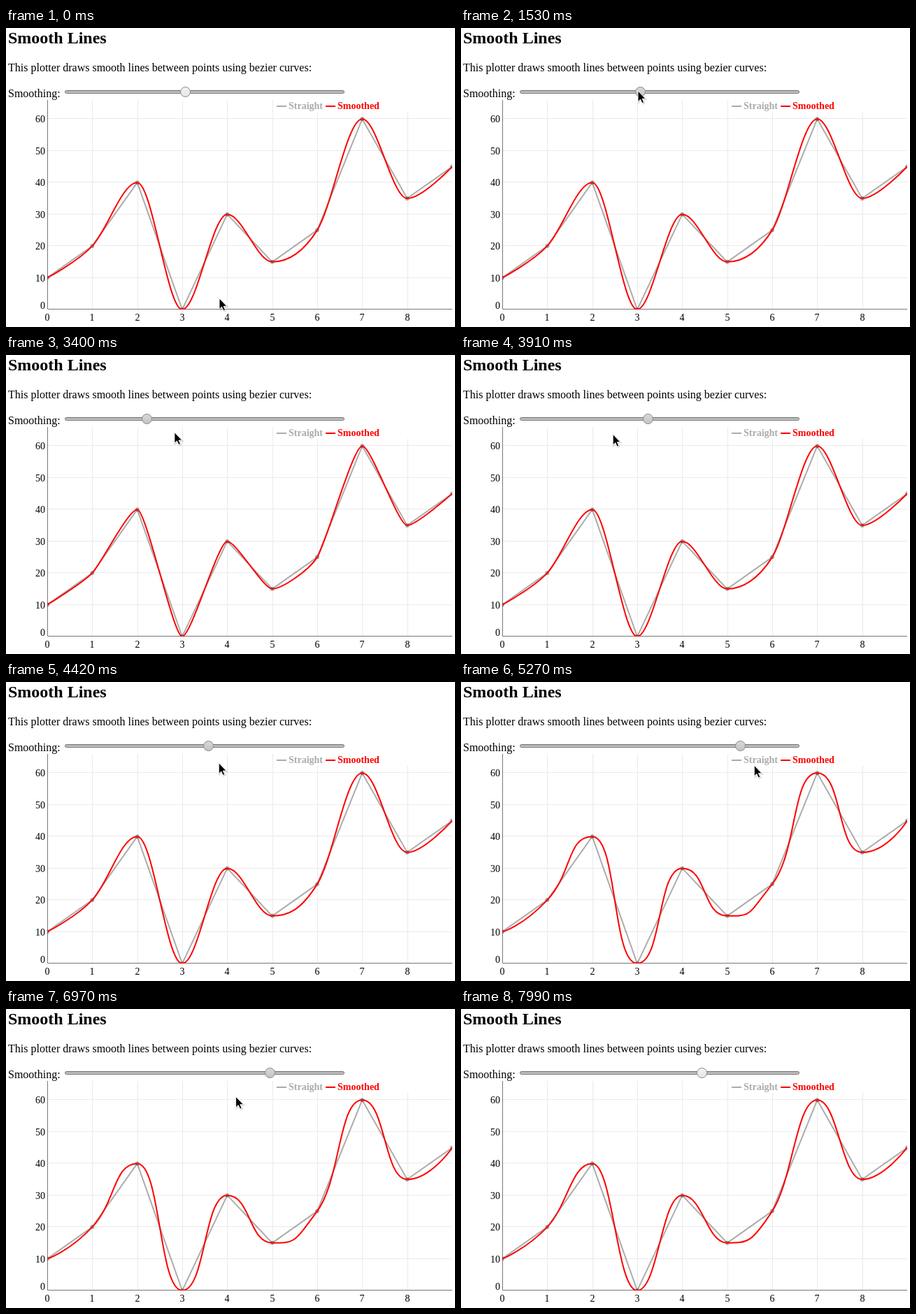
An HTML page that plays this animation: 642x428 px, repeating every 8.33 s.

```html
<!DOCTYPE html>
<html lang="en">
<head>
<meta charset="utf-8">
<title>Smooth Lines</title>
<style>
  html, body { margin: 0; width: 100%; height: 100%; overflow: hidden; background: #fff; }
  svg { display: block; font: 16px "Liberation Serif", "Times New Roman", Times, serif; }
  .title { font-size: 24px; font-weight: bold; }
  .axis { font-size: 14px; }
  .legend { font-size: 14px; font-weight: bold; }
  .mid { text-anchor: middle; }
  .end { text-anchor: end; }
  .line { fill: none; stroke-width: 2; }
  #grid path { stroke: #eaeaea; }
</style>
</head>
<body>
<svg width="642" height="428" viewBox="0 0 642 428">
  <defs>
    <clipPath id="area"><rect x="59" y="103" width="579" height="300"/></clipPath>
    <linearGradient id="bar" x2="0" y2="1">
      <stop offset="0" stop-color="#a8a8a8"/><stop offset="1" stop-color="#d0d0d0"/>
    </linearGradient>
    <linearGradient id="idle" x2="0" y2="1">
      <stop offset="0" stop-color="#f2f2f2"/><stop offset="1" stop-color="#e6e6e6"/>
    </linearGradient>
    <linearGradient id="held" x2="0" y2="1">
      <stop offset="0" stop-color="#d8d8d8"/><stop offset="1" stop-color="#c4c4c4"/>
    </linearGradient>
  </defs>

  <text class="title" x="3" y="22">Smooth Lines</text>
  <text x="3" y="62">This plotter draws smooth lines between points using bezier curves:</text>
  <text x="3" y="99">Smoothing:</text>

  <g id="grid"></g>
  <rect x="386" y="103" width="250" height="17" fill="#fff"/>
  <path d="M59.5 103V402.5H638" fill="none" stroke="#777"/>
  <g id="labels" class="axis"></g>

  <g clip-path="url(#area)">
    <g id="straight"></g>
    <path id="smooth" class="line" stroke="#f00"/>
  </g>

  <g class="legend">
    <path d="M387 112h14" stroke="#ababab" stroke-width="2"/>
    <text x="404" y="116" fill="#ababab">Straight</text>
    <path d="M457 112h14" stroke="#f00" stroke-width="2"/>
    <text x="474" y="116" fill="#f00">Smoothed</text>
  </g>

  <rect x="84.5" y="89.5" width="399" height="4" rx="2" fill="url(#bar)" stroke="#747474"/>
  <circle id="thumb" cy="91.5" r="7" stroke="#878787"/>
  <g id="cursor">
    <path d="M1 2V16.500L4.500 13.200 7 18.500 9.400 17.400 7 12.200H11.500Z" opacity=".14" stroke="#000" stroke-width="2"/>
    <path d="M0 0V15.500L3.500 12.200 6 17.600 8.500 16.500 6.100 11.300H10.800Z" stroke="#fff" stroke-width=".9"/>
  </g>
</svg>
<script>
const TICK = 170, LOOP = 8330, PRESS = 1530, RELEASE = 7990, LAG = 40;
const $ = id => document.getElementById(id);
const px = v => 59 + v * 579 / 9;
const py = v => 403 - v * 300 / 66;
const ease = p => (1 - Math.cos(Math.PI * p)) / 2;

const points = [10, 20, 40, 0, 30, 15, 25, 60, 35, 45].map((v, i) => ({ x: px(i), y: py(v) }));

// Turning points of the pointer: [ms, x]
const turns = [
  [0, 305], [340, 545], [850, 253], [PRESS, 253],
  [2125, 150], [2725, 430], [3170, 75], [3650, 430], [4047, 140], [4587, 350], [4930, 55],
  [5280, 420], [5590, 100], [5900, 440], [6390, 32], [6830, 420], [7240, 70], [7650, 400], [RELEASE, 341]
];

function pointerX(t) {
  const i = Math.max(turns.findIndex(turn => turn[0] >= t), 1);
  const [t0, x0] = turns[i - 1], [t1, x1] = turns[i];
  return x0 + (x1 - x0) * ease((t - t0) / (t1 - t0));
}

// Comes down onto the thumb, then sinks slowly during the drag
const pointerY = t => t < PRESS
  ? 387 - 297 * ease(Math.min(t / 850, 1))
  : 90 + 0.48 * Math.sqrt(t - PRESS);

// The thumb trails the pointer and snaps to 35 steps
function sliderStep(t) {
  const x = pointerX(Math.max(t - LAG, PRESS)) + 3;
  return Math.min(Math.max(Math.round((x - 91.5) / 11), 0), 35);
}

function drawStatic() {
  let grid = '', labels = '';
  for (let v = 10; v <= 60; v += 10) grid += `<path d="M60 ${Math.round(py(v)) - 0.5}H638"/>`;
  for (let i = 1; i < 9; i++) grid += `<path d="M${Math.round(px(i)) + 0.5} 103V402"/>`;
  for (let v = 0; v <= 60; v += 10)
    labels += `<text class="end" x="56" y="${Math.min(Math.round(py(v) + 5), 402)}">${v}</text>`;
  for (let i = 0; i < 9; i++)
    labels += `<text class="mid" x="${Math.round(px(i))}" y="419">${i}</text>`;
  $('grid').innerHTML = grid;
  $('labels').innerHTML = labels;
  $('straight').innerHTML =
    `<path class="line" stroke="#000" stroke-opacity=".33" d="M${points.map(p => p.x + ' ' + p.y).join('L')}"/>` +
    points.map(p => `<circle cx="${p.x}" cy="${p.y}" r="3" fill-opacity=".33"/>`).join('');
}

// Control points on either side of b, kept from overshooting its neighbours
function controls(a, b, c, alpha) {
  const mix = (p, q) => (1 - alpha) * p + alpha * q;
  const clamp = (y, p, q) => Math.min(Math.max(y, Math.min(p, q)), Math.max(p, q));
  const lx = mix(b.x, a.x), rx = mix(b.x, c.x);
  let ly = mix(b.y, a.y), ry = mix(b.y, c.y);
  if (lx !== rx) {
    const shift = b.y - ry - (b.x - rx) * (ly - ry) / (lx - rx);
    ly += shift;
    ry += shift;
  }
  const l = clamp(ly, a.y, b.y);
  if (l !== ly) { ly = l; ry = 2 * b.y - l; }
  const r = clamp(ry, b.y, c.y);
  if (r !== ry) { ry = r; ly = 2 * b.y - r; }
  return [lx, ly, rx, ry];
}

function smoothPath(alpha) {
  let { x, y } = points[0];
  let d = `M${x} ${y}`;
  for (let i = 1; i < points.length; i++) {
    const b = points[i], c = points[i + 1];
    const [lx, ly, rx, ry] = c ? controls(points[i - 1], b, c, alpha) : [b.x, b.y];
    d += `C${x} ${y} ${lx} ${ly} ${b.x} ${b.y}`;
    x = rx;
    y = ry;
  }
  return d;
}

let shown = -1;
function frame(now) {
  const t = Math.min(Math.floor(now % LOOP / TICK) * TICK, RELEASE);
  if (t !== shown) {
    shown = t;
    const step = sliderStep(t);
    const held = t >= PRESS && t < RELEASE;
    // The plot keeps its default smoothing until the slider moves
    $('smooth').setAttribute('d', smoothPath(t > PRESS ? step * 0.02 : 1 / 3));
    $('thumb').setAttribute('cx', 91.5 + step * 11);
    $('thumb').setAttribute('fill', held ? 'url(#held)' : 'url(#idle)');
    $('cursor').setAttribute('transform', `translate(${pointerX(t)} ${pointerY(t)})`);
    $('cursor').setAttribute('visibility', t < RELEASE ? 'visible' : 'hidden');
  }
  requestAnimationFrame(frame);
}

drawStatic();
frame(performance.now());
</script>
</body>
</html>
```
